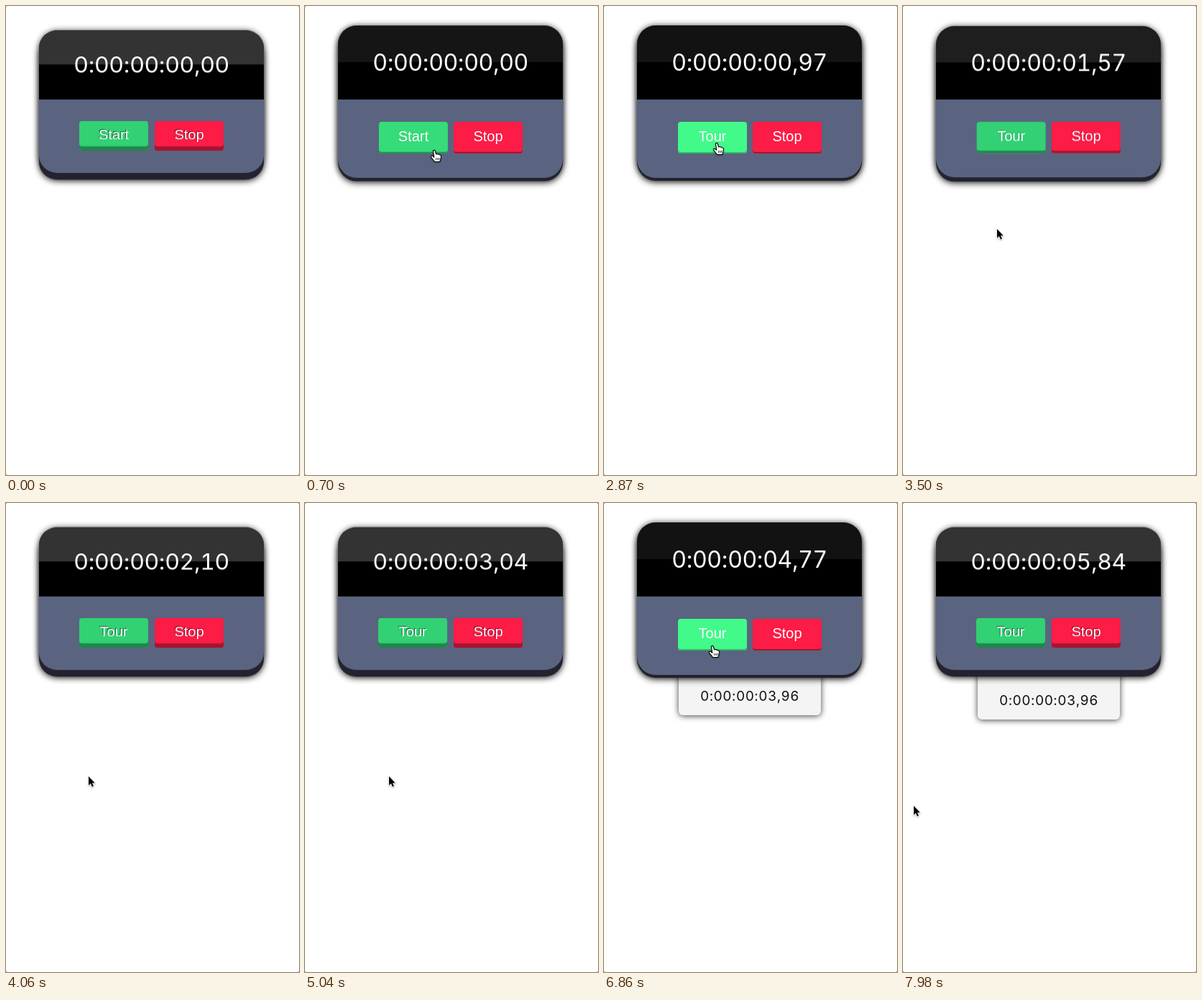
Write an HTML page that moves like this. It is 408 px wide and 652 px high and loops after 8 s.

```html
<!DOCTYPE html>
<html lang="en">
<head>
<meta charset="utf-8">
<title>Stopwatch</title>
<style>
html, body { margin: 0; width: 100%; height: 100%; overflow: hidden; background: #777; }
#stage { position: absolute; left: 0; top: 0; width: 408px; height: 652px; overflow: hidden; background: #fff; border-radius: 2px; }
#stage div, #stage svg { position: absolute; box-sizing: border-box; }
#card { left: 46px; top: 27px; width: 313px; height: 211.5px; border-radius: 26px; background: #5a6480; transform-origin: 50% 103px; }
#head { left: 0; top: 0; width: 313px; height: 103px; border-radius: 26px 26px 0 0; overflow: hidden; background: #000; }
#gloss { left: 0; top: 0; width: 100%; height: 51px; background: #fff; }
.time { left: 0; width: 100%; text-align: center; white-space: nowrap; font-family: Inter, Roboto, sans-serif; font-feature-settings: "tnum" 1; }
.time i { font-style: normal; font-feature-settings: "tnum" 0; }
#clock { top: 0; line-height: 104px; font-size: 32px; letter-spacing: -.55px; color: #fff; }
.btn { top: 134px; width: 96px; height: 44px; border-radius: 4px; text-align: center; font: 20px/41px "Liberation Sans", Arial, sans-serif; color: #fff; }
#start { left: 56px; }
#stop { left: 161px; background: #fc1c46; }
#lap { left: 104px; top: 205px; width: 198px; height: 90px; border-radius: 6px; background: #f4f4f4; box-shadow: 0 1px 8px rgba(0,0,0,.75); }
#lapTime { top: 52px; line-height: 24px; font-size: 19px; letter-spacing: .4px; color: #111; }
#over { left: 0; top: 0; }
</style>
</head>
<body>
<div id="stage">
  <div id="lap"><div id="lapTime" class="time"></div></div>
  <div id="card">
    <div id="head"><div id="gloss"></div><div id="clock" class="time"></div></div>
    <div id="start" class="btn"></div>
    <div id="stop" class="btn">Stop</div>
  </div>
  <svg id="over" width="408" height="652" fill="none">
    <g id="ring">
      <circle r="29" stroke="#fff" stroke-width="5"/>
      <circle r="29" stroke="#000" stroke-width="3"/>
    </g>
    <g id="cursor" style="filter:drop-shadow(0 1px 1px rgba(0,0,0,.3))">
      <path id="arrow" transform="scale(.9)" d="M0 0V14L3.2 11.2 5.4 16.2 7.7 15.2 5.6 10.2H9.8Z" fill="#000" stroke="#fff" stroke-width="1.6" paint-order="stroke"/>
      <g id="hand" stroke="#000" stroke-linejoin="round">
        <path d="M-1.6 1.6Q-.2-.8 1.2 1.4L2.5 6Q4 5 5 6.2 6.6 5.4 7.3 7 9.4 6.6 9.5 9L8.8 13 7.8 16.5H.6L-4.4 10.4Q-5 8-2.8 8.4L-.2 10.3Z" fill="#fff" stroke-width="1.1"/>
        <path d="M2.6 11.2V14M4.6 11V14M6.6 11V14" stroke-width=".8"/>
      </g>
    </g>
  </svg>
</div>
<script>
const LOOP = 8000, STEP = 70;
const $ = id => document.getElementById(id);
const [card, gloss, clock, start, stop, lap, lapTime, ring, cursor, arrow, hand] =
  ["card", "gloss", "clock", "start", "stop", "lap", "lapTime", "ring", "cursor", "arrow", "hand"].map($);

// All times below are counted in steps of 70 ms.
const path = [
  [4, 392, 317], [5, 376, 294], [7, 318, 232], [9, 215, 212], [10, 180, 200], [12, 160, 191], [14, 157, 190],
  [47, 157, 190], [48, 153, 210], [49, 143, 255], [50, 131, 310], [52, 118, 362], [55, 115, 380],
  [61, 115, 380], [65, 109, 381], [69, 117, 380], [75, 117, 380], [77, 126, 325], [79, 142, 238],
  [81, 150, 204], [83, 151, 198], [98, 151, 198], [99, 141, 215], [100, 121, 258], [102, 70, 348],
  [105, 22, 412], [107, 15, 421]
];
const overCard = [[7, 49], [79, 100]];
const overStart = [[10, 48], [81, 99]];
const presses = [[25, 27], [84, 86]];
const LAP_AT = 86, RUN_AT = 27;

const clamp = x => Math.max(0, Math.min(1, x));
const ease = x => (x = clamp(x), x * x * (3 - 2 * x));
const mix = (a, b, k) => a + (b - a) * k;
const rgb = (a, b, k) => `rgb(${a.map((v, i) => Math.round(mix(v, b[i], k)))})`;
const within = (spans, n) => spans.some(([a, b]) => n >= a && n < b);
const fade = (spans, n, len) => Math.max(...spans.map(([a, b]) => ease((n - a + 1) / len) - ease((n - b + 1) / len)));

function pointer(n) {
  const i = path.findIndex(p => p[0] > n);
  if (i < 0) return path[path.length - 1].slice(1);
  if (i === 0) return null;
  const a = path[i - 1], b = path[i], k = (n - a[0]) / (b[0] - a[0]);
  return [mix(a[1], b[1], k), mix(a[2], b[2], k)];
}

function showTime(el, sec) {
  const text = "0:00:00:" + sec.toFixed(2).padStart(5, "0").replace(".", ",");
  if (el.dataset.text === text) return;
  el.dataset.text = text;
  el.innerHTML = text.replace(/[:,]/g, "<i>$&</i>");
}

function draw(n) {
  const h = fade(overCard, n, 5), hot = fade(overStart, n, 3);
  const running = n >= RUN_AT;

  // The card tilts back about the lower edge of its display.
  const edge = mix(10, 4, h);
  card.style.transform = `rotateX(${mix(20.5, 0, h)}deg)`;
  card.style.boxShadow =
    `0 ${edge}px 0 #23232f, 0 0 9px rgba(0,0,0,.65), 0 ${edge + 2}px 10px rgba(0,0,0,.85)`;
  gloss.style.opacity = mix(.2, .07, h);

  const lip = mix(6.4, 2, h);
  start.style.transform = `translate(${h}px, ${1 - h}px)`;
  stop.style.transform = `translateY(${1 - h}px)`;
  start.style.background = rgb([50, 209, 116], [66, 250, 138], hot);
  start.style.boxShadow = `inset 0 -${lip}px 0 ${rgb([33, 134, 76], [46, 190, 104], hot)}`;
  stop.style.boxShadow = `inset 0 -${lip}px 0 #a9132f`;
  start.style.textShadow = stop.style.textShadow = `-1px -1px 0 rgba(0,0,0,${.55 * (1 - h)})`;
  start.textContent = running ? "Tour" : "Start";
  showTime(clock, running ? .97 + (n - 41) / 15 : 0);

  const out = 1 - (1 - clamp((n - LAP_AT + 1) / 6)) ** 2;
  lap.style.visibility = n >= LAP_AT ? "visible" : "hidden";
  lap.style.transform = `translateY(${mix(-62, 0, out) + 6 * (1 - h)}px)`;
  showTime(lapTime, 3.96);

  const p = pointer(n), onButton = within(overStart, n);
  cursor.style.display = p ? "" : "none";
  ring.style.display = within(presses, n) ? "" : "none";
  arrow.style.display = onButton ? "none" : "";
  hand.style.display = onButton ? "" : "none";
  if (p) for (const el of [cursor, ring]) el.setAttribute("transform", `translate(${p})`);
}

const begin = performance.now();
function tick() {
  draw(Math.floor((performance.now() - begin) % LOOP / STEP));
  requestAnimationFrame(tick);
}
tick();
</script>
</body>
</html>
```
